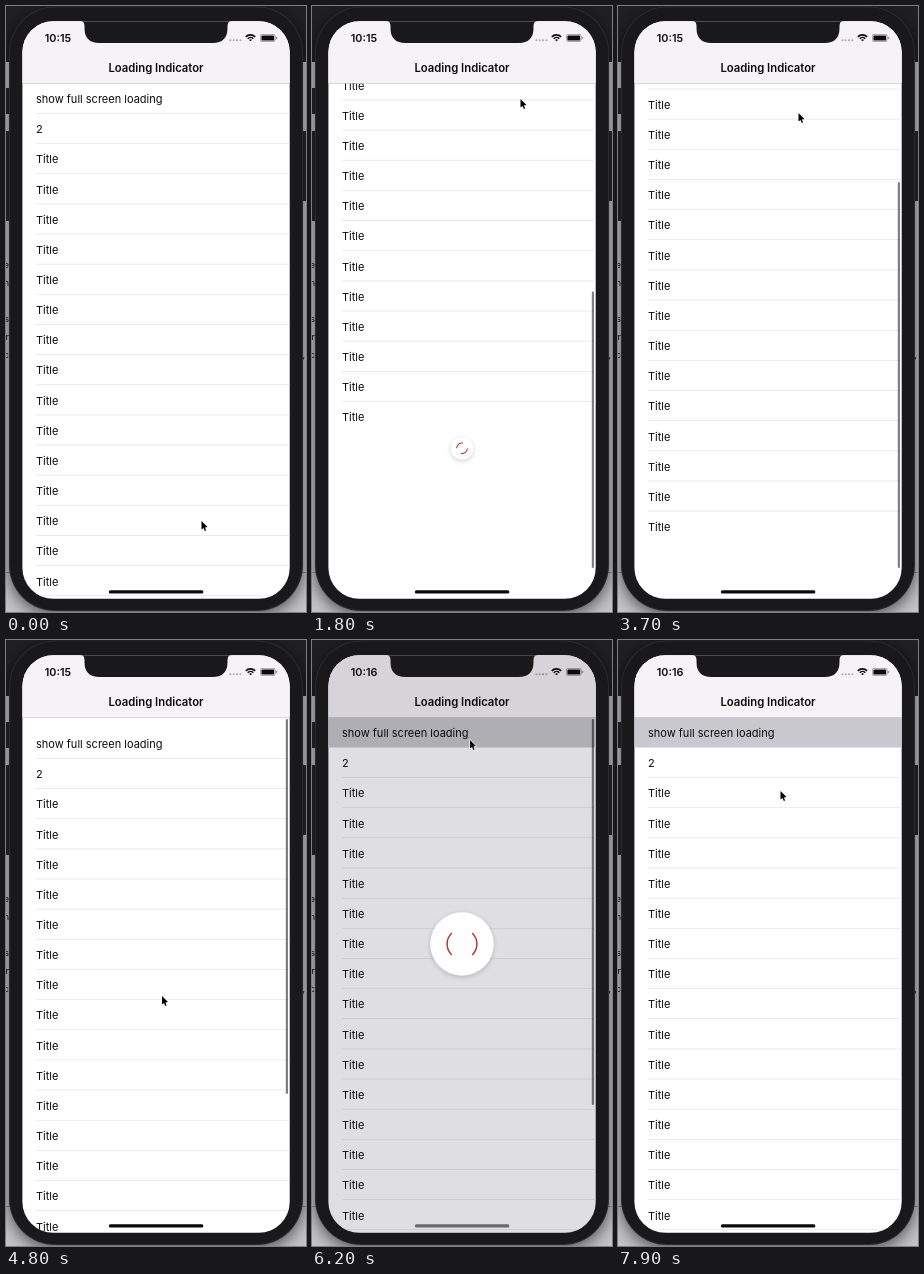
Recreate the animation shown at these times as an HTML page with a canvas. Size 300 by 606 pixels, loop 8000 ms.

```html
<!DOCTYPE html>
<html lang="en">
<head>
<meta charset="utf-8">
<title>Loading Indicator</title>
<style>
html, body { margin: 0; width: 100%; height: 100%; overflow: hidden; background: #c6c6c8; }
canvas { display: block; width: 300px; height: 606px; }
</style>
</head>
<body>
<canvas id="stage"></canvas>
<script>
const W = 300, H = 606, LOOP = 8000, STEP = 100;
const SCREEN = { x: 16.4, y: 15.2, w: 267.3, h: 577.6, r: 31 };
const TOP = 77.4, ROW = 30.15, ROWS = 20, REST = 145;
const INK = '#0b0b0c', BODY = '#19181a', GRAY = '#929295', RED = '#c22f25';
const canvas = document.getElementById('stage');
const ctx = canvas.getContext('2d');
const dpr = window.devicePixelRatio || 1;
canvas.width = W * dpr;
canvas.height = H * dpr;

const clamp = (v, lo = 0, hi = 1) => Math.min(hi, Math.max(lo, v));
const ease = k => k * k * (3 - 2 * k);
const pulse = (t, from, to, fade) => clamp(Math.min(t - from, to - t) / fade);

// Pointer moves: start, end, x, y
const MOVES = [
  [0, 100, 212, 491],
  [400, 900, 212, 454],
  [1200, 1800, 208.5, 93],
  [2100, 3700, 180.5, 107],
  [3700, 4200, 158, 190],
  [4200, 4800, 156, 356],
  [5000, 5300, 186, 160],
  [5500, 5900, 158, 100],
  [6900, 7500, 199, 66],
  [7700, 7900, 162.5, 151]
];

function pointer(t) {
  let x = 195.5, y = 515;
  for (const [from, to, toX, toY] of MOVES) {
    const k = ease(clamp((t - from) / (to - from)));
    x += (toX - x) * k;
    y += (toY - y) * k;
  }
  return { x, y };
}

// Drags past either end of the list are damped, then spring back.
function rubber(raw) {
  const edge = clamp(raw, 0, REST), over = raw - edge, span = SCREEN.h;
  return edge + Math.sign(over) * span * (1 - 1 / (Math.abs(over) * .55 / span + 1));
}

function release(raw, elapsed) {
  const edge = clamp(raw, 0, REST), k = elapsed * .009;
  const over = (rubber(raw) - edge) * (1 + k) * Math.exp(-k);
  return Math.abs(over) < .4 ? edge : edge + over;
}

function scrollAt(t) {
  const up = time => Math.max(0, 484 - pointer(time).y);
  const down = time => REST + 190.6 - pointer(time).y;
  if (t < 2000) return rubber(up(t));
  if (t < 4200) return release(up(2000), t - 2000);
  if (t < 4800) return rubber(down(t));
  return release(down(4800), t - 4800);
}

function box(x, y, w, h, color) {
  ctx.fillStyle = color;
  ctx.fillRect(x, y, w, h);
}

function roundBox(x, y, w, h, r, color) {
  ctx.beginPath();
  ctx.roundRect(x, y, w, h, r);
  ctx.fillStyle = color;
  ctx.fill();
}

function text(str, x, y, size, weight = 400, align = 'left') {
  ctx.font = `${weight} ${size}px Inter, Roboto, sans-serif`;
  ctx.textAlign = align;
  ctx.fillStyle = INK;
  ctx.fillText(str, x, y);
}

function withShadow(blur, dy, color, paint) {
  ctx.save();
  ctx.shadowColor = color;
  ctx.shadowBlur = blur * dpr;
  ctx.shadowOffsetY = dy * dpr;
  paint();
  ctx.restore();
}

function drawBackdrop() {
  box(0, 0, W, H, '#c4c4c6');
  box(0, 0, W, 56, '#202022');
  box(0, 82, 8, 26, '#262628');
  box(0, 125, 8, 90, '#262628');
  box(292, 125, 8, 70, '#262628');
  box(0, 566, W, 1, GRAY);
  [...'en src'].forEach((c, i) => text(c, 3, 262 + i * 18, 9, 400, 'right'));
  text(',', 296.5, 352, 9);
  withShadow(16, 4, 'rgba(0,0,0,.6)', () => roundBox(3, .5, 294, 604.5, 46, '#2b2b2d'));
  roundBox(4, 1.5, 292, 602.5, 45, BODY);
}

function drawArcs(x, y, r, angle, width) {
  ctx.lineWidth = width;
  ctx.lineCap = 'round';
  ctx.strokeStyle = RED;
  for (const a of [angle, angle + Math.PI]) {
    ctx.beginPath();
    ctx.arc(x, y, r, a - .78, a + .78);
    ctx.stroke();
  }
}

function drawSpinner(y, r, angle) {
  withShadow(5, 1.5, 'rgba(0,0,0,.18)', () => roundBox(150 - r, y - r, 2 * r, 2 * r, r, '#fff'));
  drawArcs(150, y, r * .47, angle, .9 + r * .018);
}

const spin = (t, at, angle) => angle + (t - at) / 1000 * Math.PI * 2;

function drawList(t, scroll) {
  for (let i = 0; i < ROWS; i++) {
    const y = TOP + i * ROW - scroll;
    if (i === 0 && t >= 6100) box(16, y, 268, ROW, '#c9c8ce');
    text(['show full screen loading', '2'][i] || 'Title', 30, y + 19.7, 11);
    if (i < ROWS - 1) box(30, y + ROW - .5, 254, .7, '#e2e2e4');
  }
  const shown = t < 3000 ? clamp((scroll - 112) / 30) : 0;
  if (shown > 0) {
    drawSpinner(TOP + ROWS * ROW - scroll + 16.5, 11.3 * shown, spin(t, 1800, Math.PI * .28));
  }
}

function drawBar(scroll, alpha) {
  const inside = clamp(scroll, 0, REST);
  const len = 386 - Math.abs(scroll - inside);
  const y = scroll > REST ? 562 - len : 79 + inside / REST * 97;
  roundBox(279.8, y, 2.2, len, 1.1, `rgba(0,0,0,${.5 * alpha})`);
}

function drawHeader(t) {
  box(16, 15, 268, 62, '#f5f3f6');
  box(16, 77, 268, .7, '#c6c5c9');
  text('Loading Indicator', 150, 66.3, 11.3, 600, 'center');
  text(t < 5000 ? '10:15' : '10:16', 38.8, 36, 10.8, 600);

  for (let i = 0; i < 4; i++) roundBox(223.4 + i * 3.3, 33.2, 2.1, 2.1, 1, '#aaaaad');

  ctx.strokeStyle = INK;
  ctx.lineCap = 'butt';
  ctx.lineWidth = 1.6;
  for (const r of [1.2, 3.8, 6.4]) {
    ctx.beginPath();
    ctx.arc(244.5, 35.3, r, -Math.PI * .76, -Math.PI * .24);
    ctx.stroke();
  }

  roundBox(254, 28, 15.6, 8, 2.4, GRAY);
  roundBox(254.7, 28.7, 14.2, 6.6, 1.8, '#f5f3f6');
  roundBox(255.4, 29.4, 12.8, 5.2, 1.2, INK);
  roundBox(270.1, 30.7, 1, 2.6, .5, GRAY);
}

function drawNotch() {
  const notch = new Path2D('M74 14V15Q78.5 15 78.5 20V22Q78.5 37 93.5 37' +
    'H206.5Q221.5 37 221.5 22V20Q221.5 15 226 15V14Z');
  ctx.fillStyle = BODY;
  ctx.fill(notch);
}

function drawModal(t, k) {
  box(16, 15, 268, 578, `rgba(12,0,18,${.13 * k})`);
  ctx.globalAlpha = k;
  drawSpinner(304, 31.7, spin(t, 6200, 0));
  ctx.globalAlpha = 1;
}

function drawPointer({ x, y }) {
  const arrow = new Path2D('M0 0V8.6L2 6.9L3.3 10L4.6 9.4L3.4 6.4L6 6.1Z');
  ctx.save();
  ctx.translate(x, y);
  ctx.lineJoin = 'round';
  ctx.lineWidth = 1.3;
  ctx.strokeStyle = '#fff';
  ctx.stroke(arrow);
  ctx.fillStyle = '#000';
  ctx.fill(arrow);
  ctx.restore();
}

function draw(t) {
  const scroll = scrollAt(t);
  const modal = pulse(t, 6000, 7500, 200);
  const bar = pulse(t, 300, 4100, 100) + pulse(t, 4200, 7400, 100);

  ctx.setTransform(dpr, 0, 0, dpr, 0, 0);
  drawBackdrop();

  ctx.save();
  roundBox(SCREEN.x, SCREEN.y, SCREEN.w, SCREEN.h, SCREEN.r, '#fff');
  ctx.clip();
  drawList(t, scroll);
  drawHeader(t);
  drawBar(scroll, bar);
  const shade = 10 + 110 * modal;
  roundBox(102.8, 584.3, 94.6, 3.2, 1.6, `rgb(${shade},${shade},${shade})`);
  if (modal > 0) drawModal(t, modal);
  drawNotch();
  ctx.restore();

  drawPointer(pointer(t));
}

const start = performance.now();
function tick() {
  const t = (performance.now() - start) % LOOP;
  draw(Math.floor(t / STEP) * STEP);
  requestAnimationFrame(tick);
}
tick();
</script>
</body>
</html>
```
